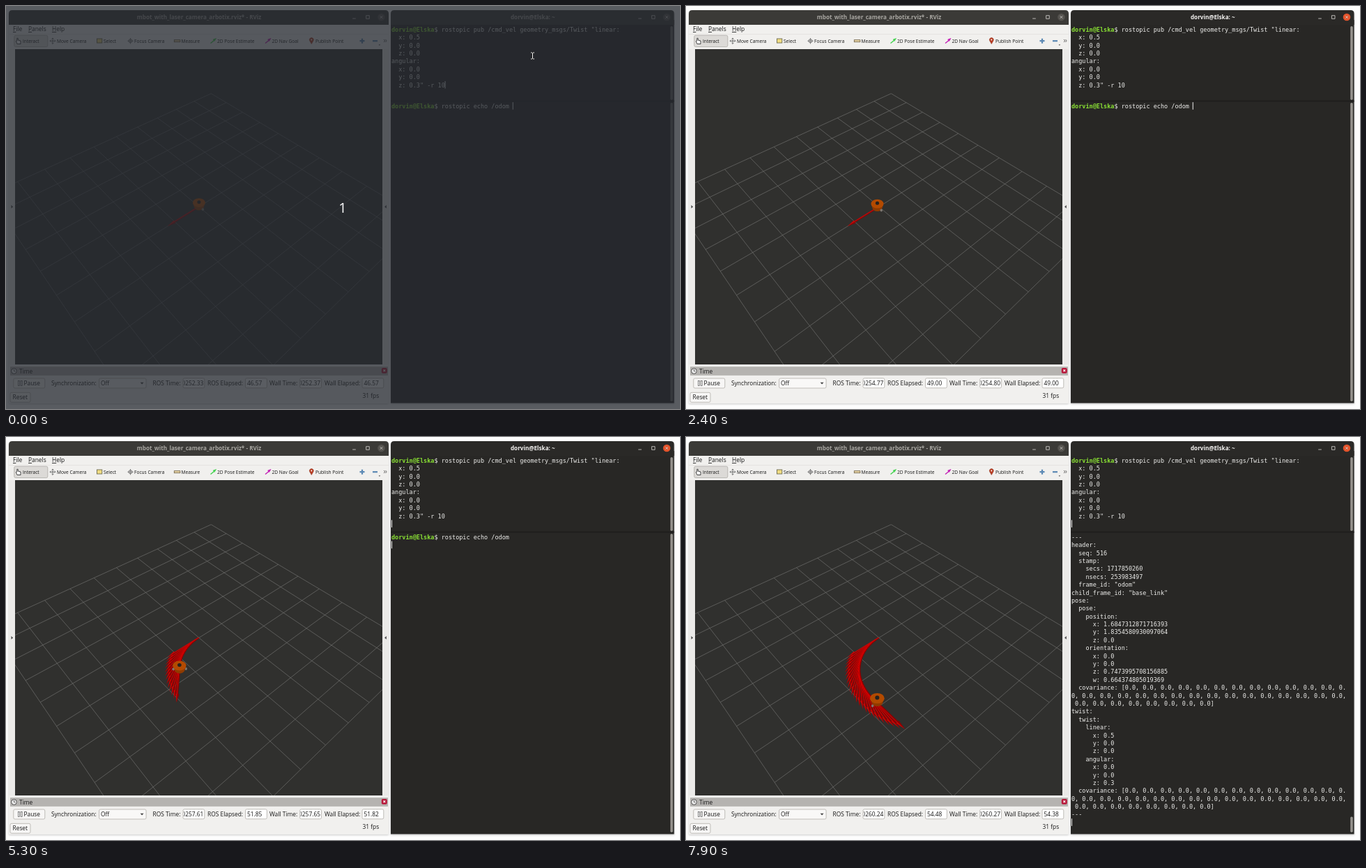
Write an HTML page with a canvas that moves like this. It is 967 px wide and 579 px high and loops after 8000 ms.

```html
<!DOCTYPE html>
<html lang="en">
<head>
<meta charset="utf-8">
<title>Odometry demo</title>
<style>
  html, body { margin: 0; width: 100%; height: 100%; overflow: hidden; background: #fdfdfd; }
  #stage { position: relative; width: 967px; height: 579px; overflow: hidden; }
  #stage > * { position: absolute; left: 0; top: 0; }
  #view { left: 13px; top: 62px; }
  #shade { width: 967px; height: 579px; background: rgb(37, 41, 48); }
  .win { box-shadow: 0 1px 3px rgba(0, 0, 0, .2); border-radius: 5px 5px 0 0; }
  text { font: 8.4px "Open Sans", "Noto Sans", sans-serif; fill: #161616; white-space: pre; }
  .tool { font-size: 6.6px; }
  .title { font-size: 8.15px; font-weight: 700; text-anchor: middle; fill: #a9a7a2; }
  .term text { font: 8.5px "DejaVu Sans Mono", "Noto Sans Mono", monospace; fill: #eeeeec; }
  .term .user { font-weight: 700; fill: #8ae234; }
  .end { text-anchor: end; }
  #count { font-size: 20px; fill: #fff; text-anchor: middle; }
</style>
</head>
<body>
<div id="stage">
  <div class="win" style="left:4px;top:6px;width:545px;height:565px"></div>
  <div class="win" style="left:552px;top:6px;width:407px;height:565px"></div>
  <svg id="ui" width="967" height="579"></svg>
  <canvas id="view" width="527" height="453"></canvas>
  <div id="shade"></div>
  <svg id="top" width="967" height="579">
    <text id="count" x="483" y="296.5">1</text>
    <g id="mouse" fill="none">
      <path d="M-2.5-4.5H-1L0-3.6 1-4.5H2.5M0-4V4M-2.5 4.5H-1L0 3.6 1 4.5H2.5" stroke="#111" stroke-width="2.2"/>
      <path d="M-2.5-4.5H-1L0-3.6 1-4.5H2.5M0-4V4M-2.5 4.5H-1L0 3.6 1 4.5H2.5" stroke="#fff" stroke-width="1"/>
    </g>
  </svg>
</div>
<script>
const LOOP = 8000, CHAR = 5.117, ROW = 11.39, TERM_X = 553;
const USER = 'dorvin@Elska';
const $ = id => document.getElementById(id);

// ---- markup helpers ----
const rect = (x, y, w, h, fill, more = '') =>
  `<rect x="${x}" y="${y}" width="${w}" height="${h}" fill="${fill}" ${more}/>`;
const path = (d, stroke, width = 1, fill = 'none') =>
  `<path d="${d}" stroke="${stroke}" stroke-width="${width}" fill="${fill}"/>`;
const dot = (x, y, r, fill, more = '') => `<circle cx="${x}" cy="${y}" r="${r}" fill="${fill}" ${more}/>`;
const label = (x, y, s, more = '') => `<text x="${x}" y="${y}" ${more}>${s}</text>`;
const box = (x, y, w, h, fill = '#fff') => rect(x, y, w, h, fill, 'rx="2" stroke="#b9b6b2" stroke-width=".9"');
const field = (x, id, end) => box(x, 534.8, 30.8, 14) +
  `<svg x="${x + 1}" y="535" width="29" height="14">` +
  label(end ? 28.3 : 1.5, 10, '', `id="${id}"` + (end ? ' class="end"' : '')) + '</svg>';

function titleBar(x, w, id, name, buttons) {
  const [a, b, c] = buttons;
  return `<path id="${id}Bar" d="M${x} 27V11q0-5 5-5H${x + w - 5}q5 0 5 5V27z" fill="#3b3a37"/>` +
    label(x + w / 2 + .5, 19.3, name, `class="title" id="${id}Title"`) +
    dot(c, 16, 5.3, '#55534f', `id="${id}Close"`) +
    path(`M${a - 2.3} 18h4.6M${b - 2.3} 13.7h4.6v4.6h-4.6zM${c - 1.8} 14.2l3.6 3.6m0-3.6l-3.6 3.6`, '#c9c7c3', .9);
}

function leftWindow() {
  const tools = [[24, 'Interact'], [73, 'Move Camera'], [140, 'Select'], [184, 'Focus Camera'],
    [251.5, 'Measure'], [303, '2D Pose Estimate'], [381.5, '2D Nav Goal'], [444, 'Publish Point']];
  const menu = [[10, 'File'], [32, 'Panels'], [66, 'Help']];
  const u = s => `<tspan text-decoration="underline">${s[0]}</tspan>${s.slice(1)}`;
  const arrow = (x, c) => path(`M${x - 4} 53.5L${x + 1} 49.5`, c, 1.4) +
    path(`M${x + 4} 46.5l-4.4 1.6 2 2.4z`, c, .6, c);
  return rect(4, 20, 545, 551, '#f1f0ee') +
    titleBar(4, 545, 'left', 'mbot_with_laser_camera_arbotix.rviz* - RViz', [499.5, 519, 538.5]) +
    menu.map(([x, s]) => label(x, 36.2, u(s))).join('') +
    path('M4 40.5H549', '#e2e0dd', .8) +
    rect(11.8, 42.2, 48, 16.4, '#dcdad7', 'rx="2" stroke="#b4b1ad" stroke-width=".9"') +
    tools.map(([x, s]) => label(x, 52.7, s, 'class="tool"')).join('') +
    path('M16 54.5L14.3 50.5 15.8 50V46.3H17.2V49L21 50V54.5z', '#333', .9, '#fff') +
    path('M67 46V54.4M63 50.2H71M65.6 47.4L67 46l1.4 1.4M65.6 53L67 54.4 68.4 53M64.4 48.8L63 50.2l1.4 1.4M69.6 48.8L71 50.2l-1.4 1.4', '#666', .9) +
    rect(130.5, 47, 7.3, 6, '#f0dc82', 'stroke="#6c6a50" stroke-width=".9"') +
    dot(178.5, 50.2, 2.5, 'none', 'stroke="#666" stroke-width=".9"') +
    path('M178.5 46V54.4M174.3 50.2H182.7', '#666', .8) +
    rect(241.3, 48.7, 8.6, 3, '#e6d3a4', 'stroke="#6b5d43" stroke-width=".8"') +
    arrow(297.5, '#3fd24a') + arrow(376, '#c21ab4') +
    path('M438.3 54.5L435.7 50a3 3 0 1 1 5.2 0z', '#8c2f1c', .5, '#b83c22') + dot(438.3, 48.4, 1, '#fff') +
    path('M511 46.7V53.7M507.5 50.2H514.5', '#5b88b4', 2.2) + path('M526 50.2H533', '#5b88b4', 2.2) +
    path('M534.6 55.3h2.6l-1.3 1.6z', 'none', 0, '#555') +
    path('M542 48l1.8 2-1.8 2M544.4 48l1.8 2-1.8 2', '#444', .8) +
    rect(4, 62, 9, 453, '#ebeae8') + rect(540, 62, 9, 453, '#ebeae8') +
    path('M7.5 286l2.6 2.4-2.6 2.4z', 'none', 0, '#444') + path('M545.8 286l-2.6 2.4 2.6 2.4z', 'none', 0, '#444') +
    rect(6, 518.2, 542, 12.6, '#b5b3b0') + label(19, 527.7, 'Time') +
    dot(11.5, 524.5, 3.8, '#eee', 'stroke="#444" stroke-width=".9"') + path('M11.5 522V524.7H13.5', '#444', .8) +
    rect(538.8, 519.9, 8, 7.8, '#b8173a', 'rx="2"') + path('M541.4 522.4l2.8 2.8m0-2.8l-2.8 2.8', '#fff', 1.1) +
    box(10.8, 535, 45, 14, '#f7f6f5') + rect(17.4, 538.5, 2, 7, '#fff', 'stroke="#555" stroke-width=".7"') +
    rect(21.2, 538.5, 2, 7, '#fff', 'stroke="#555" stroke-width=".7"') + label(25.5, 545, 'Pause') +
    label(65, 545.2, 'Synchronization:') + box(133.6, 535, 67.5, 14, '#f9f8f7') + label(136, 545, 'Off') +
    path('M192.6 540.8h5l-2.5 2.8z', 'none', 0, '#444') +
    label(210.5, 545.2, 'ROS Time:') + field(254, 'rosTime', true) +
    label(289, 545.2, 'ROS Elapsed:') + field(343.5, 'rosElapsed') +
    label(378, 545.2, 'Wall Time:') + field(421.7, 'wallTime', true) +
    label(457, 545.2, 'Wall Elapsed:') + field(511, 'wallElapsed') +
    box(6, 555.3, 29, 14, '#f7f6f5') + label(9.5, 565.2, 'Reset') + label(511.5, 563, '31 fps');
}

const prompt = cmd => `<tspan class="user">${USER}</tspan>$ ${cmd}`;
const rowY = (base, i) => base + i * ROW;

function rightWindow() {
  const cmd = [prompt('rostopic pub /cmd_vel geometry_msgs/Twist "linear:'), '  x: 0.5', '  y: 0.0', '  z: 0.0',
    'angular:', '  x: 0.0', '  y: 0.0', '  z: 0.3" -r 10'];
  let out = rect(552, 20, 406.6, 550.6, '#282725') +
    titleBar(552, 406.6, 'right', USER + ': ~', [909.5, 928.7, 948]) +
    rect(552, 135.6, 406.6, 2, '#1f1e1d') + '<g class="term">';
  cmd.forEach((s, i) => out += label(TERM_X, rowY(36.8, i), s));
  for (let i = 0; i < 37; i++) out += label(TERM_X, rowY(146.8, i), '', `id="row${i}"`);
  return out + '</g>' +
    rect(953.2, 29, 3.6, 106, '#8d8b87', 'rx="1.8" class="thumb"') +
    rect(953.2, 139, 3.6, 429, '#8d8b87', 'rx="1.8" class="thumb" id="thumb"') +
    rect(0, 0, 1, 10.6, '#eee', 'id="caretA"') + rect(0, 0, 1, 10.6, '#eee', 'id="caretB"');
}

$('ui').innerHTML = leftWindow() + rightWindow();

// ---- time helpers ----
const mix = (a, b, k) => a + (b - a) * k;
function track(keys, t) {
  let i = 1;
  while (i < keys.length - 1 && keys[i][0] < t) i++;
  const [a, b] = [keys[i - 1], keys[i]];
  const k = Math.min(1, Math.max(0, (t - a[0]) / (b[0] - a[0])));
  return a.slice(1).map((v, j) => mix(v, b[j + 1], k));
}
// ms, ROS clock, wall elapsed
const CLOCK = [[0, 252.337, 46.572], [500, 252.852, 47.082], [2400, 254.772, 49.002], [3600, 255.925, 50.162],
  [5300, 257.617, 51.822], [6800, 259.155, 53.362], [7900, 260.245, 54.382], [8000, 260.345, 54.482]];
const MOUSE = [[0, 755.5, 71.5], [500, 755.5, 73], [950, 749.7, 84], [2950, 749.7, 84], [3500, 760, 198.5], [8000, 760, 198.5]];
const FOCUS = 800, RUN = 2200, SWITCH = 4600, ECHO = 5000, FIRST = 5600;

// ---- odometry ----
const SPEED = .5, TURN = .3, RADIUS = SPEED / TURN, MOVE_CLOCK = 254.627;
const TRAIL_STEP = .069, TRAIL_LAG = .045;
const pose = a => ({ x: RADIUS * Math.sin(a), y: RADIUS * (1 - Math.cos(a)), a });
const ODOM = [
  { n: 505, ns: 259073626041, x: 1.6403361514133534, y: 1.250024042637989, z: 0.6186990580759901 },
  { n: 516, ns: 260253983497, x: 1.6847312871716393, y: 1.8354580930097064, z: 0.7473995708156885 }
].map(o => {
  const a = 2 * Math.asin(o.z), p = pose(a);
  return { ...o, a, dx: o.x - p.x, dy: o.y - p.y };
});

function message(n) {
  const k = (n - 505) / 11, at = key => mix(ODOM[0][key], ODOM[1][key], k);
  const a = at('a'), p = pose(a), ns = Math.round(at('ns'));
  const cov = ('  covariance: [' + Array(36).fill('0.0').join(', ') + ']').match(/.{1,77}/g);
  const xyz = (pad, x, y, z) => [`x: ${x}`, `y: ${y}`, `z: ${z}`].map(s => ' '.repeat(pad) + s);
  return ['header:', `  seq: ${n}`, '  stamp:', `    secs: ${1717850000 + Math.floor(ns / 1e9)}`,
    `    nsecs: ${String(ns % 1e9).padStart(9)}`, '  frame_id: "odom"', 'child_frame_id: "base_link"',
    'pose:', '  pose:', '    position:', ...xyz(6, p.x + at('dx'), p.y + at('dy'), '0.0'),
    '    orientation:', ...xyz(6, '0.0', '0.0', Math.sin(a / 2)), `      w: ${Math.cos(a / 2)}`, ...cov,
    'twist:', '  twist:', '    linear:', ...xyz(6, '0.5', '0.0', '0.0'),
    '    angular:', ...xyz(6, '0.0', '0.0', '0.3'), ...cov, '---'];
}

let shown = null;
function drawEcho(n) {
  if (n === shown) return;
  shown = n;
  const lines = n ? message(n) : [];
  for (let i = 1; i < 37; i++) $('row' + i).textContent = lines[i - 1] || '';
  const first = 493, count = n ? n - first + 1 : 0;
  $('row0').innerHTML = count > 1 ? '---' : prompt('rostopic echo /odom');
  const h = count > 1 ? Math.max(22.5, 429 * 37 / (37 + 35 * (count - 1))) : 429;
  $('thumb').setAttribute('y', 568 - h);
  $('thumb').setAttribute('height', h);
}

// ---- 3D view: orbit camera around the origin ----
const CAM = { yaw: .863, pitch: .814, dist: 12.4, f: 547 };
const [SY, CY, SP, CP] = [Math.sin(CAM.yaw), Math.cos(CAM.yaw), Math.sin(CAM.pitch), Math.cos(CAM.pitch)];
const g = $('view').getContext('2d');
function project(x, y, h = 0) {
  const u = y * CY - x * SY, v = x * CY + y * SY;
  const s = CAM.f / (CAM.dist - v * CP - h * SP);
  return { x: 276.9 + u * s, y: 288.4 + (v * SP - h * CP) * s, s, v };
}
function poly(points, fill) {
  g.beginPath();
  points.forEach(([x, y]) => g.lineTo(x, y));
  g.closePath();
  g.fillStyle = fill;
  g.fill();
}
function oval(p, rx, ry, fill) {
  g.beginPath();
  g.ellipse(p.x, p.y, rx, ry, 0, 0, 7);
  g.fillStyle = fill;
  g.fill();
}
function drawGrid() {
  g.beginPath();
  const line = (a, b) => { g.moveTo(a.x, a.y); g.lineTo(b.x, b.y); };
  for (let i = -5; i <= 5; i++) {
    line(project(i, -5), project(i, 5));
    line(project(-5, i), project(5, i));
  }
  g.strokeStyle = '#7a7a78';
  g.lineWidth = .6;
  g.stroke();
}
function drawArrow({ x, y, a }) {
  const at = d => project(x + d * Math.cos(a), y + d * Math.sin(a));
  const tail = at(0), neck = at(1), tip = at(1.3);
  const len = Math.hypot(tip.x - tail.x, tip.y - tail.y);
  const nx = -(tip.y - tail.y) / len, ny = (tip.x - tail.x) / len;
  const off = (p, d) => [p.x + nx * d * p.s, p.y + ny * d * p.s];
  const half = (side, fill) => poly([off(tail, 0), off(tail, side * .025), off(neck, side * .025),
    off(neck, side * .05), off(tip, 0)], fill);
  half(1, '#d00000');
  half(-1, '#8c0000');
}
function drawRobot({ x, y, a }) {
  const wheels = [1, -1].map(k => project(x - k * .19 * Math.sin(a), y + k * .19 * Math.cos(a), .03));
  const mid = project(x, y);
  const wheel = p => oval(p, 1.7, 2, '#7d7771');
  wheels.filter(p => p.v <= mid.v).forEach(wheel);
  const low = project(x, y, .04), cap = project(x, y, .19), r = .2 * cap.s;
  poly([[cap.x - r, cap.y], [cap.x + r, cap.y], [low.x + r * .76, low.y + 2], [low.x - r * .76, low.y + 2]], '#8f3b00');
  oval({ x: low.x, y: low.y + 1 }, r * .78, r * .6, '#8f3b00');
  wheels.filter(p => p.v > mid.v).forEach(wheel);
  oval(cap, r, r * .72, '#b34a00');
  oval({ x: cap.x, y: cap.y - .9 }, r * .29, r * .28, '#26221f');
}
function drawView(clock) {
  g.setTransform(1, 0, 0, 1, -13, -62);
  g.fillStyle = '#30302e';
  g.fillRect(13, 62, 527, 453);
  drawGrid();
  const now = TURN * Math.max(0, clock - MOVE_CLOCK);
  drawArrow(pose(0));
  for (let a = TRAIL_STEP; a <= now - TRAIL_LAG; a += TRAIL_STEP) drawArrow(pose(a));
  drawRobot(pose(now));
}

// ---- frame ----
function caret(id, base, row, col, on) {
  const c = $(id);
  c.setAttribute('x', TERM_X + col * CHAR + (col ? -.2 : 0));
  c.setAttribute('y', rowY(base, row) - 8.6);
  c.setAttribute('opacity', on ? 1 : 0);
}
const cut = v => (Math.floor(v * 100) / 100).toFixed(2);

function draw(t) {
  const [clock, elapsed] = track(CLOCK, t);
  $('rosTime').textContent = '1717850' + cut(clock);
  $('wallTime').textContent = '1717850' + cut(clock + .034);
  $('rosElapsed').textContent = cut(clock - 205.764);
  $('wallElapsed').textContent = cut(elapsed);
  drawView(clock);

  const focused = t >= FOCUS;
  $('rightBar').setAttribute('fill', focused ? '#2a2927' : '#3b3a37');
  $('rightTitle').style.fill = focused ? '#f4f3f1' : '';
  $('rightClose').setAttribute('fill', focused ? '#e4542c' : '#55534f');
  document.querySelectorAll('.thumb').forEach(e => e.setAttribute('fill', focused ? '#96948f' : '#6c6a67'));

  drawEcho(t < FIRST ? 0 : 505 + Math.floor((t - 6800) / 100 + .01));
  const blinkA = Math.floor((t - 900) / 600) % 2 === 1;
  const ranA = t >= RUN, ranB = t >= ECHO;
  caret('caretA', 36.8, ranA ? 8 : 7, ranA ? 0 : 15, t < 900 || t >= SWITCH || blinkA);
  caret('caretB', 146.8, t >= FIRST ? 36 : ranB ? 1 : 0, ranB ? 0 : 34,
    !ranB || Math.floor((t - ECHO) / 600) % 2 === 0);

  const fade = Math.max(0, 1 - t / 250);
  $('shade').style.opacity = .76 * fade;
  $('count').style.opacity = fade;
  const [mx, my] = track(MOUSE, t);
  $('mouse').setAttribute('transform', `translate(${mx} ${my})`);
  $('mouse').style.opacity = t < RUN || (t >= 2900 && t < ECHO) ? 1 : 0;
}

const start = performance.now();
function tick() {
  draw((performance.now() - start) % LOOP);
  requestAnimationFrame(tick);
}
tick();
</script>
</body>
</html>
```
